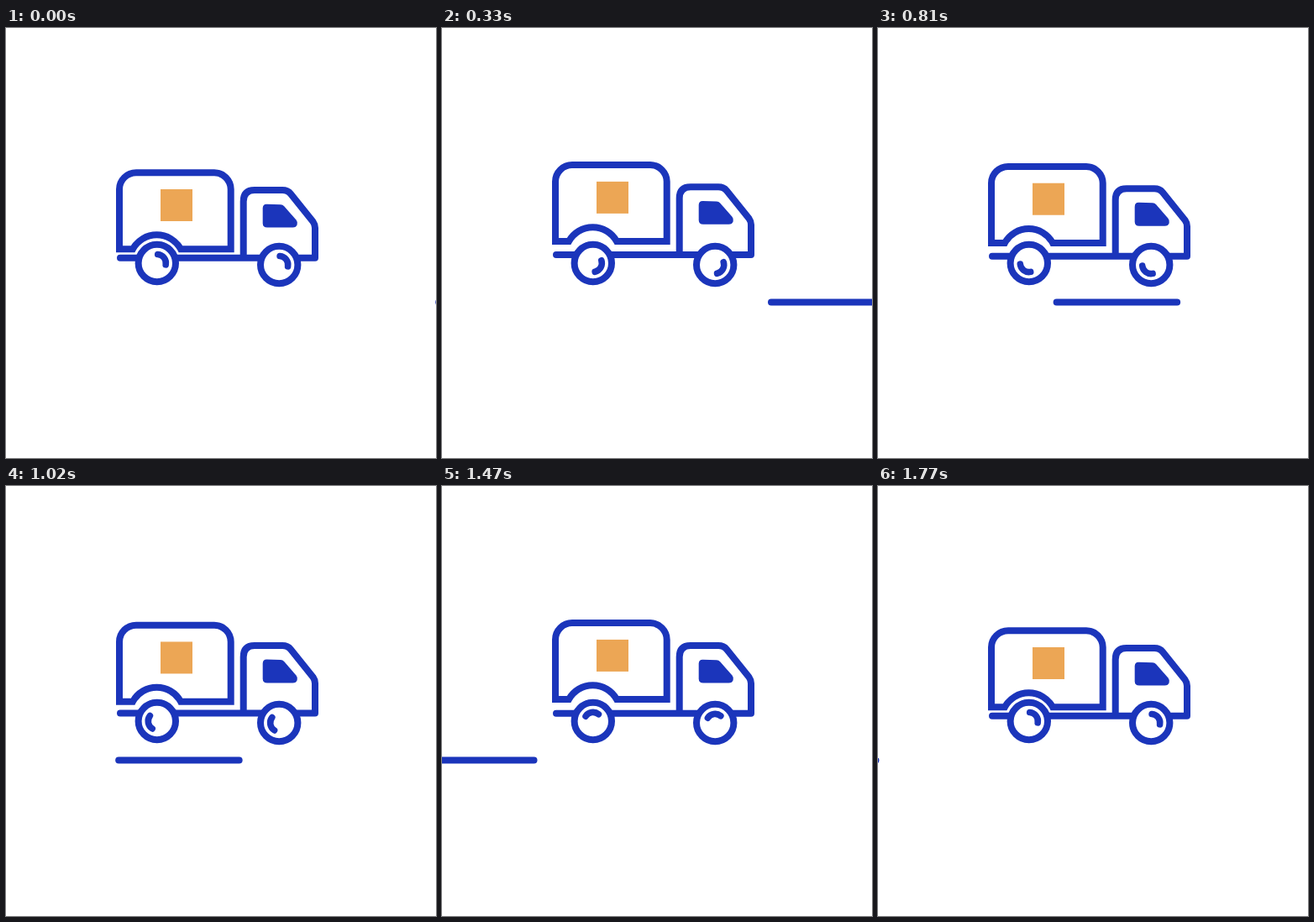
An HTML page for the animation above (1.8 s loop, 512x512 px).

```html
<!DOCTYPE html>
<html lang="en">
<head>
<meta charset="utf-8">
<title>Delivery truck</title>
<style>
  html, body { margin: 0; width: 100%; height: 100%; overflow: hidden; background: #fff; }
  svg { display: block; width: 100%; height: 100%; }
  .line { fill: none; stroke: #1b35bb; stroke-width: 8; stroke-linejoin: round; stroke-linecap: round; }
  .box { stroke-linejoin: miter; }
  .tyre { fill: #fff; }
  .shine { stroke-width: 7.6; }
</style>
</head>
<body>
<svg viewBox="0 0 512 512">
  <path id="road" class="line" d="M0 326.5h143.5"/>
  <g id="cab">
    <path class="line" d="M136 273.7H368V238Q368 234 365.5 230.5L339 197.5Q335.500 193 329 193H296Q282.700 193 282.700 206.500V273.700"/>
    <path fill="#1b35bb" d="M310.500 209.700L327 210.200Q329.500 210.300 331.200 212.200L345.500 228.500Q347.500 231 346.700 234Q345.500 237.500 341.500 237.500H311Q305.700 237.500 305.700 232.500V214.500Q305.700 209.600 310.500 209.700Z"/>
  </g>
  <g id="box">
    <path class="line box" d="M135 263.200V192A20 20 0 0 1 155 172.200H248A20 20 0 0 1 267.700 192V263.200H208A32.500 32.500 0 0 0 151 263.200Z"/>
    <rect x="184" y="192" width="38" height="38" fill="#eca655"/>
  </g>
  <g transform="translate(179.800 280)">
    <circle class="line tyre" r="22.200"/>
    <path class="line shine wheel"/>
  </g>
  <g transform="translate(325.200 282)">
    <circle class="line tyre" r="22.200"/>
    <path class="line shine wheel"/>
  </g>
</svg>
<script>
  const LOOP = 1800, STEP = 30, LAST = LOOP / STEP - 1;
  const road = document.getElementById('road');
  const cab = document.getElementById('cab');
  const box = document.getElementById('box');
  const wheels = document.querySelectorAll('.wheel');

  // Bounce keys: [step, lift in px]
  const boxKeys = [[0, 0], [12, 9.3], [21, 1.5], [30, 9.3], [40, 1.5], [50, 9.3], [LAST, 0]];
  const cabKeys = [[0, 0], [12, 3.8], [22, 0.3], [32, 3.4], [42, 0.3], [51, 3.4], [LAST, 0]];

  const smooth = x => x * x * (3 - 2 * x);

  function lift(keys, step) {
    const i = Math.max(1, keys.findIndex(([at]) => at >= step));
    const [from, a] = keys[i - 1], [to, b] = keys[i];
    return a + (b - a) * smooth((step - from) / (to - from));
  }

  const move = (el, x, y) => el.setAttribute('transform', `translate(${x} ${y})`);

  wheels.forEach(w => w.setAttribute('d', 'M.9 -10.500A10.500 10.500 0 0 1 10.400 1.800'));

  function draw(time) {
    const step = Math.floor((time % LOOP) / STEP);
    move(road, 515.3 - 11.21 * step, 0);
    move(box, 0, -lift(boxKeys, step));
    move(cab, 0, -lift(cabKeys, step));
    wheels.forEach(w => w.setAttribute('transform', `rotate(${360 * step / LAST})`));
  }

  const start = performance.now();
  function tick() {
    draw(performance.now() - start);
    requestAnimationFrame(tick);
  }
  tick();
</script>
</body>
</html>
```
